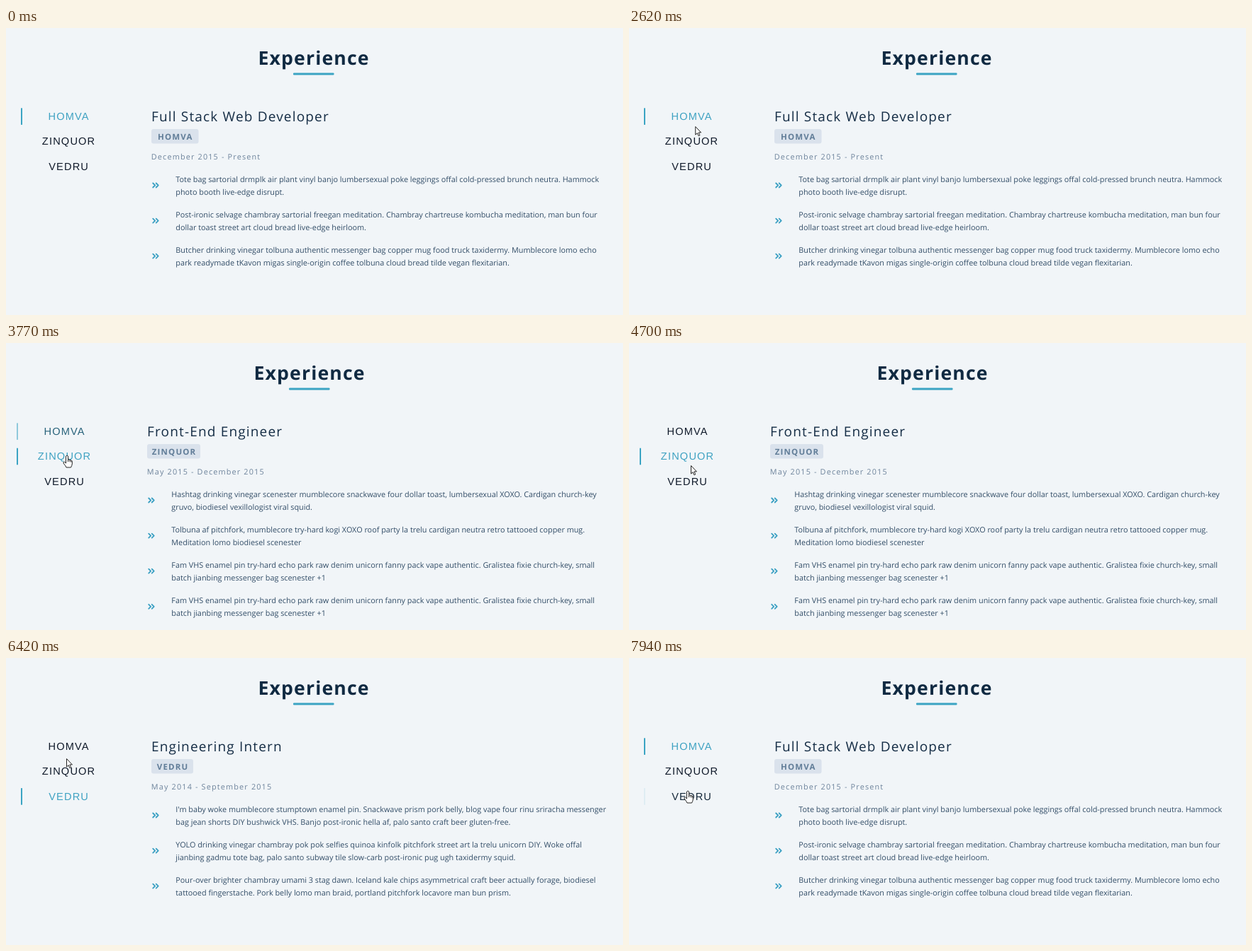
These frames come from a looping animation (870 px wide and 406 px high, 8000 ms). An HTML page:

```html
<!DOCTYPE html>
<html lang="en">
<head>
<meta charset="utf-8">
<title>Experience</title>
<style>
  html, body { margin: 0; width: 100%; height: 100%; overflow: hidden; background: #f1f5f8; }
  svg { display: block; }
  text { font-family: "Open Sans", "Noto Sans", sans-serif; font-size: 10.83px; fill: #324d67; text-rendering: geometricPrecision; white-space: pre; }
  .heading { font-size: 26.6px; font-weight: 700; letter-spacing: 1.17px; fill: #102a42; }
  .title { font-size: 19px; letter-spacing: 1.17px; fill: #152d45; }
  .tag { font-size: 11.5px; font-weight: 700; letter-spacing: 1.17px; fill: #617d98; text-anchor: middle; }
  .date { letter-spacing: 1.17px; fill: #6d839b; }
  .tab { font-family: "Liberation Sans", Arial, sans-serif; font-size: 14.6px; letter-spacing: 1.17px; text-anchor: middle; }
  .chevron { fill: none; stroke: #3ba0c3; stroke-width: 1.8; stroke-linejoin: round; stroke-linecap: round; }
</style>
</head>
<body>
<svg id="stage" width="870" height="406" viewBox="0 0 870 406"></svg>
<script>
const LOOP = 8000, FADE = 300, SHIFT = -6;
const DARK = [16, 26, 42], TEAL = [63, 162, 194];

const jobs = [
  { company: 'HOMVA', title: 'Full Stack Web Developer', date: 'December 2015 - Present', tagWidth: 66.5, duties: [
    ['Tote bag sartorial drmplk air plant vinyl banjo lumbersexual poke leggings offal cold-pressed brunch neutra. Hammock',
     'photo booth live-edge disrupt.'],
    ['Post-ironic selvage chambray sartorial freegan meditation. Chambray chartreuse kombucha meditation, man bun four',
     'dollar toast street art cloud bread live-edge heirloom.'],
    ['Butcher drinking vinegar tolbuna authentic messenger bag copper mug food truck taxidermy. Mumblecore lomo echo',
     'park readymade tKavon migas single-origin coffee tolbuna cloud bread tilde vegan flexitarian.']] },
  { company: 'ZINQUOR', title: 'Front-End Engineer', date: 'May 2015 - December 2015', tagWidth: 75, duties: [
    ['Hashtag drinking vinegar scenester mumblecore snackwave four dollar toast, lumbersexual XOXO. Cardigan church-key',
     'gruvo, biodiesel vexillologist viral squid.'],
    ['Tolbuna af pitchfork, mumblecore try-hard kogi XOXO roof party la trelu cardigan neutra retro tattooed copper mug.',
     'Meditation lomo biodiesel scenester'],
    ...Array(2).fill([
     'Fam VHS enamel pin try-hard echo park raw denim unicorn fanny pack vape authentic. Gralistea fixie church-key, small',
     'batch jianbing messenger bag scenester +1'])] },
  { company: 'VEDRU', title: 'Engineering Intern', date: 'May 2014 - September 2015', tagWidth: 59, duties: [
    ["I'm baby woke mumblecore stumptown enamel pin. Snackwave prism pork belly, blog vape four rinu sriracha messenger",
     'bag jean shorts DIY bushwick VHS. Banjo post-ironic hella af, palo santo craft beer gluten-free.'],
    ['YOLO drinking vinegar chambray pok pok selfies quinoa kinfolk pitchfork street art la trelu unicorn DIY. Woke offal',
     'jianbing gadmu tote bag, palo santo subway tile slow-carb post-ironic pug ugh taxidermy squid.'],
    ['Pour-over brighter chambray umami 3 stag dawn. Iceland kale chips asymmetrical craft beer actually forage, biodiesel',
     'tattooed fingerstache. Pork belly lomo man braid, portland pitchfork locavore man bun prism.']] }
];

// Spans of time in which each tab is hovered or active.
const lit = [
  [[-FADE, 3630], [6500, 9000]],
  [[2950, 5670], [6250, 6330], [7690, 7770]],
  [[4910, 7040], [7910, 9000]]
];
const clicks = [[3500, 3630], [5530, 5600], [6970, 7040]];

// Pointer moves: first step, last step, step count, destination.
const start = { x: 905, y: 405 };
const moves = [
  [190, 320, 3, 584, 224],
  [590, 730, 3, 435, 210],
  [1080, 1260, 4, 355, 210],
  [1520, 1660, 3, 264, 184],
  [1860, 2080, 4, 112, 124],
  [2280, 2750, 8, 87, 144],
  [2950, 3080, 3, 86, 159],
  [4500, 4700, 4, 87, 173],
  [4770, 5050, 5, 86, 191],
  [6150, 6420, 5, 85, 142],
  [6490, 6630, 3, 84, 123],
  [7520, 7940, 7, 83, 188]
];

const stage = document.getElementById('stage');
function add(parent, name, attrs = {}, content = '') {
  const node = document.createElementNS('http://www.w3.org/2000/svg', name);
  for (const key in attrs) node.setAttribute(key, attrs[key]);
  node.textContent = content;
  return parent.appendChild(node);
}
const addText = (parent, cls, x, y, content) => add(parent, 'text', { class: cls, x, y }, content);
const show = (node, visible) => node.setAttribute('display', visible ? 'inline' : 'none');
const clamp = v => Math.max(0, Math.min(1, v));

const page = add(stage, 'g');
addText(page, 'heading', 355.4, 51.8, 'Experience');
add(page, 'rect', { x: 405, y: 63.5, width: 57.5, height: 3, rx: 1, fill: '#3ba4c3' });

const tabs = jobs.map((job, i) => ({
  label: addText(page, 'tab', 88.6, 130 + i * 35.3, job.company),
  bar: add(page, 'rect', { x: 21, y: 113.3 + i * 35.4, width: 2, height: 23.6, fill: '#3ba4c3' })
}));

const panels = jobs.map(job => {
  const panel = add(page, 'g');
  addText(panel, 'title', 205, 132, job.title);
  add(panel, 'rect', { x: 205, y: 143, width: job.tagWidth, height: 20.5, rx: 3, fill: '#dae2ec' });
  addText(panel, 'tag', 205.6 + job.tagWidth / 2, 157.8, job.company);
  addText(panel, 'date', 204.8, 186, job.date);
  job.duties.forEach((lines, i) => {
    const y = 218 + i * 50.1;
    add(panel, 'path', { class: 'chevron', d: `M207.2 ${y + 1.5}l3 3l-3 3m4.5 -6l3 3l-3 3` });
    lines.forEach((line, row) => addText(panel, 'duty', 239.3, y + row * 17.6, line));
  });
  return panel;
});

const glow = add(stage, 'circle', { r: 7.5, fill: '#f5ec3c', opacity: .78 });
const outline = { fill: '#fff', stroke: '#222', 'stroke-width': 1, 'stroke-linejoin': 'round' };
const cursors = {
  beam: add(stage, 'path', { fill: 'none', stroke: '#333', d: 'M-2.5 -5.5H-.8L0 -4.8L.8 -5.5H2.5M0 -5V5M-2.5 5.5H-.8L0 4.8L.8 5.5H2.5' }),
  arrow: add(stage, 'path', { ...outline, d: 'M.5 .5V12L3.1 9.6L4.9 13.7L6.7 12.9L4.9 8.9H8.4Z' }),
  hand: add(stage, 'path', { ...outline, d: 'M-1.5 1Q0 -1 1.5 1V6Q3 5.2 4 6.6Q5.3 6 6 7.3Q7.3 7 7.3 8.9V12Q7 14.5 5.5 17H-1Q-2 14.5 -5 11Q-5.5 8.8 -3.5 9.2L-1.5 11Z M1.5 6V9M4 6.8V9.3M6 7.6V9.6' })
};

function pointerAt(t) {
  let { x, y } = start;
  for (const [from, to, count, endX, endY] of moves) {
    if (t < from) break;
    const step = Math.min(count - 1, Math.floor((t - from) / (to - from) * (count - 1) + .001));
    const k = (step + 1) / count;
    x += (endX - x) * k;
    y += (endY - y) * k;
  }
  return { x, y };
}

function cursorKind({ x, y }) {
  if (x > 200) return 'beam';
  const overTab = y > 113 && y < 208 && (y - 113.3) % 35.4 < 23.6;
  return x < 155 && overTab ? 'hand' : 'arrow';
}

function litLevel(spans, t) {
  return Math.max(...spans.map(([from, to]) => {
    const rise = clamp((Math.min(t, to) - from) / FADE);
    return clamp(rise - Math.max(0, t - to) / FADE);
  }));
}

function render(t) {
  const current = t < 3630 ? 0 : t < 5670 ? 1 : t < 7040 ? 2 : 0;
  page.setAttribute('transform', `translate(${current === 1 ? SHIFT : 0} 0)`);
  panels.forEach((panel, i) => show(panel, i === current));

  tabs.forEach(({ label, bar }, i) => {
    const level = litLevel(lit[i], t);
    const rgb = DARK.map((c, n) => Math.round(c + (TEAL[n] - c) * level));
    label.style.fill = `rgb(${rgb})`;
    bar.setAttribute('opacity', level);
  });

  const pointer = pointerAt(t), kind = cursorKind(pointer);
  for (const name in cursors) {
    show(cursors[name], name === kind && t >= moves[0][0]);
    cursors[name].setAttribute('transform', `translate(${pointer.x} ${pointer.y})`);
  }
  glow.setAttribute('cx', pointer.x - 1);
  glow.setAttribute('cy', pointer.y - 1);
  show(glow, clicks.some(([from, to]) => t >= from && t < to));
}

let origin;
function tick(now) {
  origin ??= now;
  render((now - origin) % LOOP);
  requestAnimationFrame(tick);
}
render(0);
requestAnimationFrame(tick);
</script>
</body>
</html>
```
